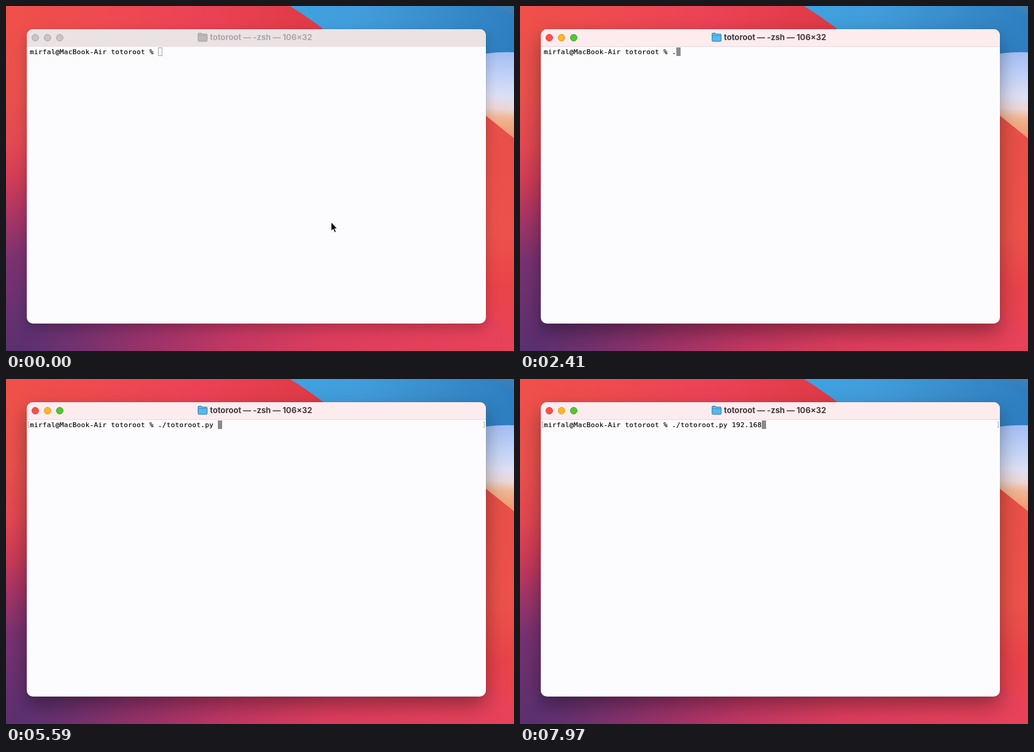
An HTML page for the animation above (7990 ms loop, 832 px wide and 566 px high).

```html
<!DOCTYPE html>
<html lang="en">
<head>
<meta charset="utf-8">
<title>Terminal</title>
<style>
  html, body { margin: 0; width: 100%; height: 100%; overflow: hidden; }
  #stage { position: relative; width: 832px; height: 566px; overflow: hidden; }
  svg { position: absolute; left: 0; top: 0; }
  .window {
    position: absolute; left: 34px; top: 38px; width: 752px; height: 483px;
    border-radius: 10px; overflow: hidden; background: #fcfcfe;
    box-shadow: 0 0 1px rgba(0,0,0,.4), 0 14px 32px rgba(0,0,0,.36);
  }
  .bar { height: 28px; background: #fcecee; border-bottom: 1px solid #e6d9db; }
  .title { font: 700 13.1px Inter, sans-serif; fill: #423b3e; }
  .line {
    font: 11px "DejaVu Sans Mono", monospace; letter-spacing: .378px;
    fill: #000; stroke: #000; stroke-width: .15px; white-space: pre;
  }
  #caret { fill: #8b8a8c; }
  .red { fill: #fb4f49; stroke: #dc3f3c; }
  .amber { fill: #fdb52b; stroke: #df9a22; }
  .green { fill: #55c437; stroke: #43a52c; }
  .folder { fill: #55b9ef; stroke: #3a7ba6; }
  .idle .window { box-shadow: 0 0 1px rgba(0,0,0,.4), 0 8px 20px rgba(0,0,0,.22); }
  .idle .bar { background: #ebe2e4; border-color: #ebe2e4; }
  .idle .title { fill: #aea5a8; }
  .idle .light { fill: #cac2c4; stroke: #aea6a8; }
  .idle .folder { fill: #c1b7b9; stroke: #a59c9f; }
  .idle #caret { fill: #fcfcfe; stroke: #a3a3a5; }
</style>
</head>
<body>
<div id="stage" class="idle">
  <svg width="832" height="566">
    <defs>
      <linearGradient id="left" gradientUnits="userSpaceOnUse" x1="0" y1="0" x2="150" y2="540">
        <stop offset="0" stop-color="#f0504a"/>
        <stop offset=".25" stop-color="#e9514c"/>
        <stop offset=".4" stop-color="#e24852"/>
        <stop offset=".5" stop-color="#cf3c57"/>
        <stop offset=".6" stop-color="#a83565"/>
        <stop offset=".72" stop-color="#7a3270"/>
        <stop offset="1" stop-color="#583070"/>
      </linearGradient>
      <linearGradient id="top" gradientUnits="userSpaceOnUse" x1="0" y1="0" x2="520" y2="0">
        <stop offset="0" stop-color="#f0504a"/>
        <stop offset=".3" stop-color="#ee4a50"/>
        <stop offset=".6" stop-color="#ec4256"/>
        <stop offset="1" stop-color="#de3a45"/>
      </linearGradient>
      <linearGradient id="sky" gradientUnits="userSpaceOnUse" x1="470" y1="0" x2="832" y2="60">
        <stop offset="0" stop-color="#3fa2e0"/>
        <stop offset=".3" stop-color="#429cdb"/>
        <stop offset=".65" stop-color="#398dcc"/>
        <stop offset="1" stop-color="#2d7ec0"/>
      </linearGradient>
      <linearGradient id="glow" gradientUnits="userSpaceOnUse" x1="800" y1="77" x2="790" y2="215">
        <stop offset="0" stop-color="#a5bff3"/>
        <stop offset=".25" stop-color="#c0d0f7"/>
        <stop offset=".5" stop-color="#dcdff4"/>
        <stop offset=".65" stop-color="#ecd6d6"/>
        <stop offset=".76" stop-color="#f0b694"/>
        <stop offset="1" stop-color="#ef9468"/>
      </linearGradient>
      <linearGradient id="right" gradientUnits="userSpaceOnUse" x1="0" y1="180" x2="0" y2="566">
        <stop offset="0" stop-color="#e84f48"/>
        <stop offset=".5" stop-color="#ec524b"/>
        <stop offset=".73" stop-color="#e9434a"/>
        <stop offset="1" stop-color="#e8425a"/>
      </linearGradient>
      <linearGradient id="bottom" gradientUnits="userSpaceOnUse" x1="20" y1="545" x2="832" y2="625">
        <stop offset="0" stop-color="#5a3071"/>
        <stop offset=".1" stop-color="#6e316f"/>
        <stop offset=".25" stop-color="#97326a"/>
        <stop offset=".42" stop-color="#c03763"/>
        <stop offset=".62" stop-color="#dc3d5d"/>
        <stop offset="1" stop-color="#e8425a"/>
      </linearGradient>
    </defs>
    <rect width="832" height="566" fill="url(#left)"/>
    <path d="M0 0H540V60H34V36Z" fill="url(#top)"/>
    <path d="M465 0Q494 18 520 38L575 90H832V0Z" fill="url(#sky)"/>
    <path d="M790 0L832 14V0Z" fill="#3b80b6"/>
    <path d="M770 160H832V566H770Z" fill="url(#right)"/>
    <path d="M770 80L786 78Q810 75 832 76V217L786 180L770 167Z" fill="url(#glow)"/>
    <path d="M34 505H790L832 545V566H20Z" fill="url(#bottom)"/>
  </svg>

  <div class="window"><div class="bar"></div></div>

  <svg width="832" height="566">
    <circle class="light red" cx="48" cy="52" r="5.5"/>
    <circle class="light amber" cx="68" cy="52" r="5.5"/>
    <circle class="light green" cx="88" cy="52" r="5.5"/>
    <g class="folder">
      <path d="M314.5 46Q314.5 44.5 316 44.5H320L321.5 46H328Q329.5 46 329.5 47.5V56.5Q329.5 58 328 58H316Q314.5 58 314.5 56.5Z"/>
      <path d="M315 48.5H329" opacity=".6"/>
    </g>
    <text class="title" x="334" y="56">totoroot — -zsh — 106×32</text>
    <path id="marks" d="M38.5 70.5H36.5V79.5H38.5M781.5 70.5H783.5V79.5H781.5" fill="none" stroke="#a8a8a9"/>
    <rect id="caret"/>
    <text class="line" id="line" x="39" y="79"></text>
    <path id="arrow" d="M532.5 354.5V369L535.8 366L538.2 371.5L540.6 370.4L538.3 365.2H542.5Z" fill="#000" stroke="#fff"/>
    <path id="beam" d="M530 348.5Q533.5 348.5 533.5 351V361Q533.5 363.5 530 363.5M537 348.5Q533.5 348.5 533.5 351M537 363.5Q533.5 363.5 533.5 361M531.5 356.5H535.5" fill="none" stroke="#111"/>
  </svg>
</div>
<script>
  const LOOP = 7990, CELL = 7, LEFT = 39;
  const FOCUS_AT = 690;
  const PROMPT = "mirfal@MacBook-Air totoroot % ";
  const SCRIPT = "./totoroot.py ";

  // [start in ms, typed text]; the script name is completed in one go
  const typing = [
    [0, ""], [2300, "."], [2750, "./"], [3200, "./t"], [4300, SCRIPT],
    [5600, SCRIPT + "1"], [5980, SCRIPT + "19"], [6360, SCRIPT + "192"],
    [6800, SCRIPT + "192."], [7150, SCRIPT + "192.1"],
    [7500, SCRIPT + "192.16"], [7850, SCRIPT + "192.168"]
  ];

  const get = id => document.getElementById(id);
  const [stage, line, caret, marks, arrow, beam] =
    ["stage", "line", "caret", "marks", "arrow", "beam"].map(get);
  const show = (el, on) => el.setAttribute("visibility", on ? "visible" : "hidden");

  function draw(time) {
    const idle = time < FOCUS_AT;
    const typed = typing.filter(([start]) => start <= time).pop()[1];
    const text = PROMPT + typed;
    const inset = idle ? 0.5 : 0;

    stage.className = idle ? "idle" : "";
    line.textContent = text;
    caret.setAttribute("x", LEFT + text.length * CELL + inset);
    caret.setAttribute("y", 68 + inset);
    caret.setAttribute("width", CELL - 2 * inset);
    caret.setAttribute("height", 14 - 2 * inset);
    show(marks, typed.length >= SCRIPT.length);
    show(arrow, idle);
    show(beam, !idle && !typed);
  }

  const begin = performance.now();
  function tick() {
    draw((performance.now() - begin) % LOOP);
    requestAnimationFrame(tick);
  }
  tick();
</script>
</body>
</html>
```
